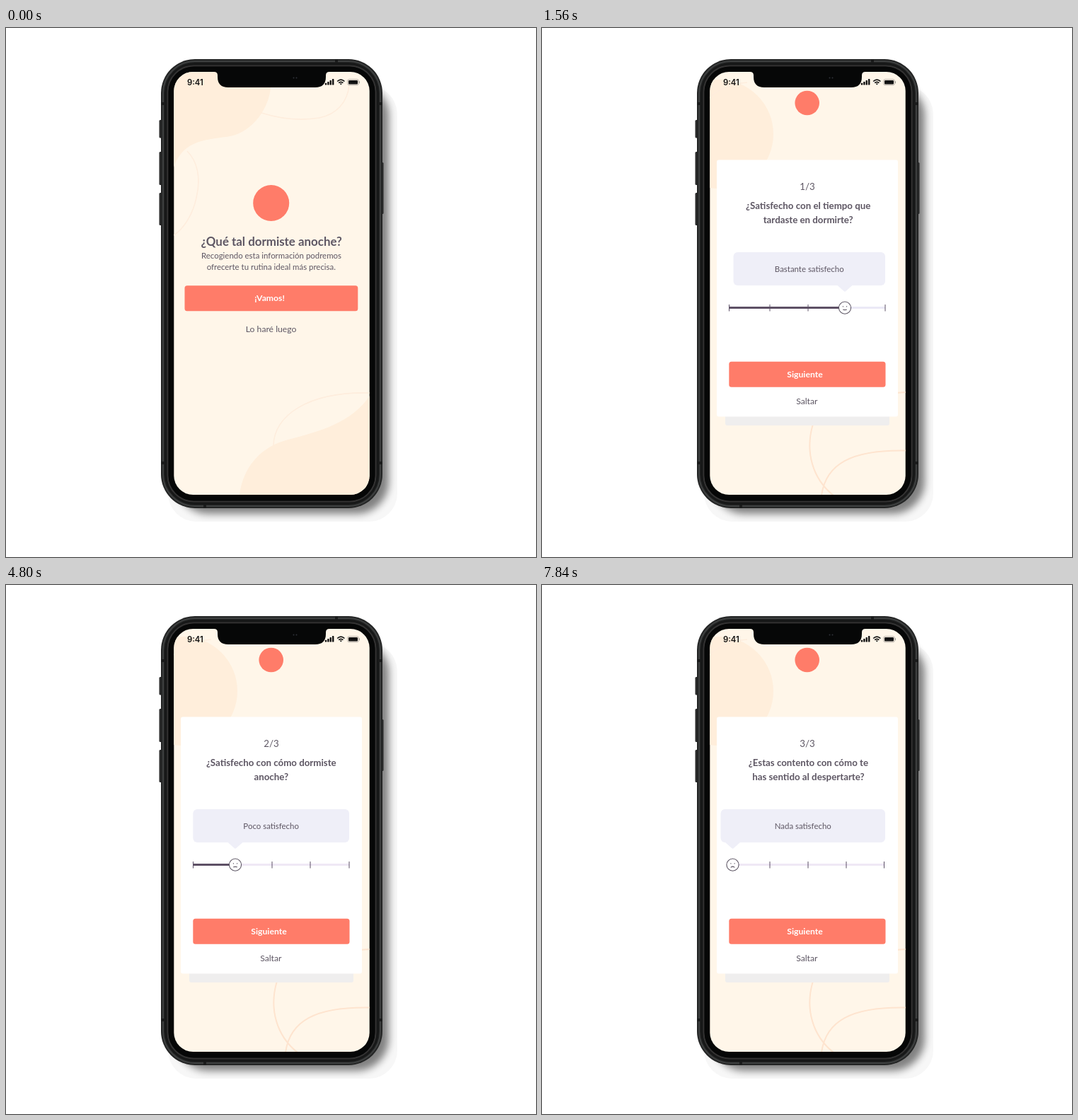
An HTML page for the animation above (8 s loop, 749 by 748 pixels).

```html
<!DOCTYPE html>
<html lang="es">
<head>
<meta charset="utf-8">
<title>Encuesta de descanso</title>
<style>
  html, body { margin: 0; width: 100%; height: 100%; overflow: hidden; background: #fff; }
  svg { display: block; width: 100vw; height: 100vh; }
  text { font-family: Lato, sans-serif; fill: #5d5663; text-anchor: middle; }
  .bold { font-weight: 700; }
  .title { font-size: 16.9px; }
  .body { font-size: 11.45px; }
  .link { font-size: 12.2px; }
  .ask { font-size: 13.3px; }
  .cta { font-size: 12.2px; fill: #fff; }
  .clock { font: 600 11.3px Inter, sans-serif; fill: #111; text-anchor: start; }
  .peach { fill: #ffeedb; }
  .coral { fill: #ff7c69; }
  .wire { fill: none; stroke: #feeddd; stroke-width: 1.6; }
  .wire.deep { stroke: #fee4cf; stroke-width: 2; }
  .ring { fill: none; stroke-width: 2; }
  .tick { stroke: #5c5067; stroke-width: 1; }
  .face { fill: none; stroke: #5c5563; stroke-width: 1.1; stroke-linecap: round; }
</style>
</head>
<body>
<svg viewBox="0 0 749 748" preserveAspectRatio="none">
  <defs>
    <filter id="soft" x="-20%" y="-20%" width="140%" height="140%"><feGaussianBlur stdDeviation="5.500"/></filter>
    <clipPath id="glass"><rect x="237.300" y="62" width="276.400" height="598" rx="27"/></clipPath>
  </defs>

  <rect x="229" y="82" width="324" height="616" rx="40" fill="#f7f7f7"/>
  <rect x="240" y="78" width="301" height="609" rx="46" fill="#000" opacity=".48" filter="url(#soft)"/>

  <g fill="#2a2b2b">
    <rect x="216.500" y="130" width="5" height="25.500" rx="1.500"/>
    <rect x="216.500" y="175" width="5" height="47" rx="1.500"/>
    <rect x="216.500" y="233" width="5" height="46" rx="1.500"/>
    <rect x="529" y="190" width="4.500" height="73" rx="1.500"/>
  </g>
  <rect x="219" y="44" width="313" height="635" rx="48" fill="#232424"/>
  <rect class="ring" x="222" y="47" width="307" height="629" rx="45" stroke="#3d3f3f"/>
  <rect x="224" y="49" width="303" height="625" rx="43" fill="#171818"/>
  <g fill="#1a1b1b">
    <rect x="219" y="105" width="6" height="4"/><rect x="526" y="105" width="6" height="4"/>
    <rect x="219" y="613" width="6" height="4"/><rect x="526" y="613" width="6" height="4"/>
    <rect x="465" y="44" width="4" height="5"/><rect x="279" y="674" width="4" height="5"/>
  </g>
  <rect class="ring" x="228.500" y="53.500" width="294" height="616" rx="37" stroke="#343333"/>
  <rect x="229.500" y="54.500" width="292" height="614" rx="36" fill="#060707"/>

  <g clip-path="url(#glass)">
    <rect x="237" y="62" width="277" height="598" fill="#fff6e9"/>

    <g id="intro">
      <path class="peach" d="M237 62H374V84C372 112 350 146 317 153C284 158 250 158 237 197Z"/>
      <path class="wire" d="M361 120C383 127 413 132 443 127C467 122 483 105 485 80"/>
      <path class="wire" d="M256 174C270 188 276 211 269 240C264 264 251 284 237 293"/>
      <path class="peach" d="M330 660C335 622 358 595 392 584C435 572 486 562 514 520V660Z"/>
      <path class="wire" d="M378 591C378 548 427 514 514 516"/>
      <circle class="coral" cx="374.700" cy="247.500" r="25.500"/>
      <text class="title bold" x="375.200" y="308">¿Qué tal dormiste anoche?</text>
      <text class="body" x="375" y="325.500">Recogiendo esta información podremos</text>
      <text class="body" x="374.800" y="342">ofrecerte tu rutina ideal más precisa.</text>
      <rect class="coral" x="252.500" y="364.300" width="244.800" height="36" rx="3.500"/>
      <text class="cta bold" x="372.500" y="386">¡Vamos!</text>
      <text class="link" x="374.600" y="430">Lo haré luego</text>
    </g>

    <g id="survey">
      <circle class="peach" cx="250" cy="150" r="77"/>
      <path class="wire" d="M237 99C246 88 265 79 290 77"/>
      <path class="wire deep" d="M383 560C371 600 383 638 412 661M395 661C401 616 438 596 514 597.500M500 516L514 515"/>
      <circle class="coral" cx="374.700" cy="106" r="17.300"/>
      <rect x="259" y="540" width="232" height="22" rx="3" fill="#efeeee"/>
      <rect x="247" y="186.500" width="256" height="363" rx="3" fill="#fff"/>
      <g id="cards"></g>
      <rect class="coral" x="264.300" y="471.800" width="221.200" height="36" rx="3.500"/>
      <text class="cta bold" x="371.500" y="494">Siguiente</text>
      <text class="link" x="374.300" y="531.500">Saltar</text>
    </g>

    <text class="clock" x="256" y="80.700">9:41</text>
    <g id="bars" fill="#111"></g>
    <g fill="none" stroke="#111" stroke-width="1.700">
      <path d="M468.200 75.500Q473.300 70.700 478.400 75.500M470.200 77.700Q473.300 74.900 476.400 77.700"/>
      <path d="M471.700 78.800L473.300 80.600L474.900 78.800Q473.300 77.600 471.700 78.800Z" fill="#111" stroke="none"/>
    </g>
    <rect x="482.700" y="72.700" width="15.600" height="8" rx="2.200" fill="none" stroke="#a5a09a" stroke-width=".8"/>
    <rect x="484" y="74" width="13" height="5.400" rx="1.200" fill="#111"/>
    <path d="M499.400 75.200V78.200" stroke="#a5a09a"/>
  </g>
  <path fill="#060707" d="M294 61V62Q299 62 299 67V69Q299 84 314 84H437Q452 84 452 69V67Q452 62 457 62V61Z"/>
  <circle cx="406.500" cy="70.500" r="1" fill="#30323a"/>
  <circle cx="410.500" cy="70.500" r="1" fill="#30323a"/>
</svg>

<script>
const LOOP = 8000;
const byId = id => document.getElementById(id);

// at: start time, knob: slider position, left: bubble edge, mood: mouth curve
const steps = [
  { at: 1560, ask: ['¿Satisfecho con el tiempo que', 'tardaste en dormirte?'], mid: 376.2,
    answer: 'Bastante satisfecho', knob: 428, left: 270.5, mood: 0.6, rail: '#ebe9f6', end: 485 },
  { at: 4280, ask: ['¿Satisfecho con cómo dormiste', 'anoche?'], mid: 374.8,
    answer: 'Poco satisfecho', knob: 324, left: 264.3, mood: -0.8, rail: '#efe8f5', end: 485 },
  { at: 7020, ask: ['¿Estas contento con cómo te', 'has sentido al despertarte?'], mid: 376.4,
    answer: 'Nada satisfecho', knob: 269.5, left: 252.5, mood: -2, rail: '#efe8f5', end: 483.5 }
];

const tick = x => `<path class="tick" d="M${x} 391V400.500"/>`;

function card(s, i) {
  const { knob: k, left, end } = s;
  const start = Math.min(264.5, k);
  const ticks = [264.5, 322, 376, 430, end].filter(x => Math.abs(x - k) > 6).map(tick).join('');
  return `<g>
    <text class="ask" x="375" y="228.500">${i + 1}/3</text>
    ${s.ask.map((line, n) => `<text class="ask bold" x="${s.mid}" y="${256 + n * 19.5}">${line}</text>`).join('')}
    <rect x="${left}" y="317" width="${485 - left}" height="47" rx="6" fill="#efeff8"/>
    <path d="M${k - 11} 363.500H${k + 11}L${k + 1.5} 372Q${k} 373.500 ${k - 1.5} 372Z" fill="#efeff8"/>
    <text class="body" x="${(left + 485) / 2}" y="345">${s.answer}</text>
    <path d="M${start} 395.600H${end}" stroke="${s.rail}" stroke-width="3"/>
    <path d="M${start} 395.600H${k}" stroke="#5e5065" stroke-width="3"/>
    ${ticks}
    <circle class="face" cx="${k}" cy="395.600" r="8.600" style="fill:#fff"/>
    <path class="face" d="M${k - 2.6} 393.600v.3M${k + 2.6} 393.600v.3M${k - 2.4} ${398.5 - s.mood / 3}q2.400 ${s.mood} 4.800 0"/>
  </g>`;
}

byId('cards').innerHTML = steps.map(card).join('');
byId('bars').innerHTML = [0, 1, 2, 3].map(i => {
  const h = 2.8 + i * 1.9;
  return `<rect x="${450.8 + i * 3.4}" y="${80.6 - h}" width="2.400" height="${h}" rx=".6"/>`;
}).join('');

const cards = [...byId('cards').children];
const show = (el, on) => { el.style.display = on ? '' : 'none'; };

function draw() {
  const t = performance.now() % LOOP;
  const current = steps.filter(s => t >= s.at).length - 1;
  show(byId('intro'), current < 0);
  show(byId('survey'), current >= 0);
  cards.forEach((el, i) => show(el, i === current));
  requestAnimationFrame(draw);
}
draw();
</script>
</body>
</html>
```
